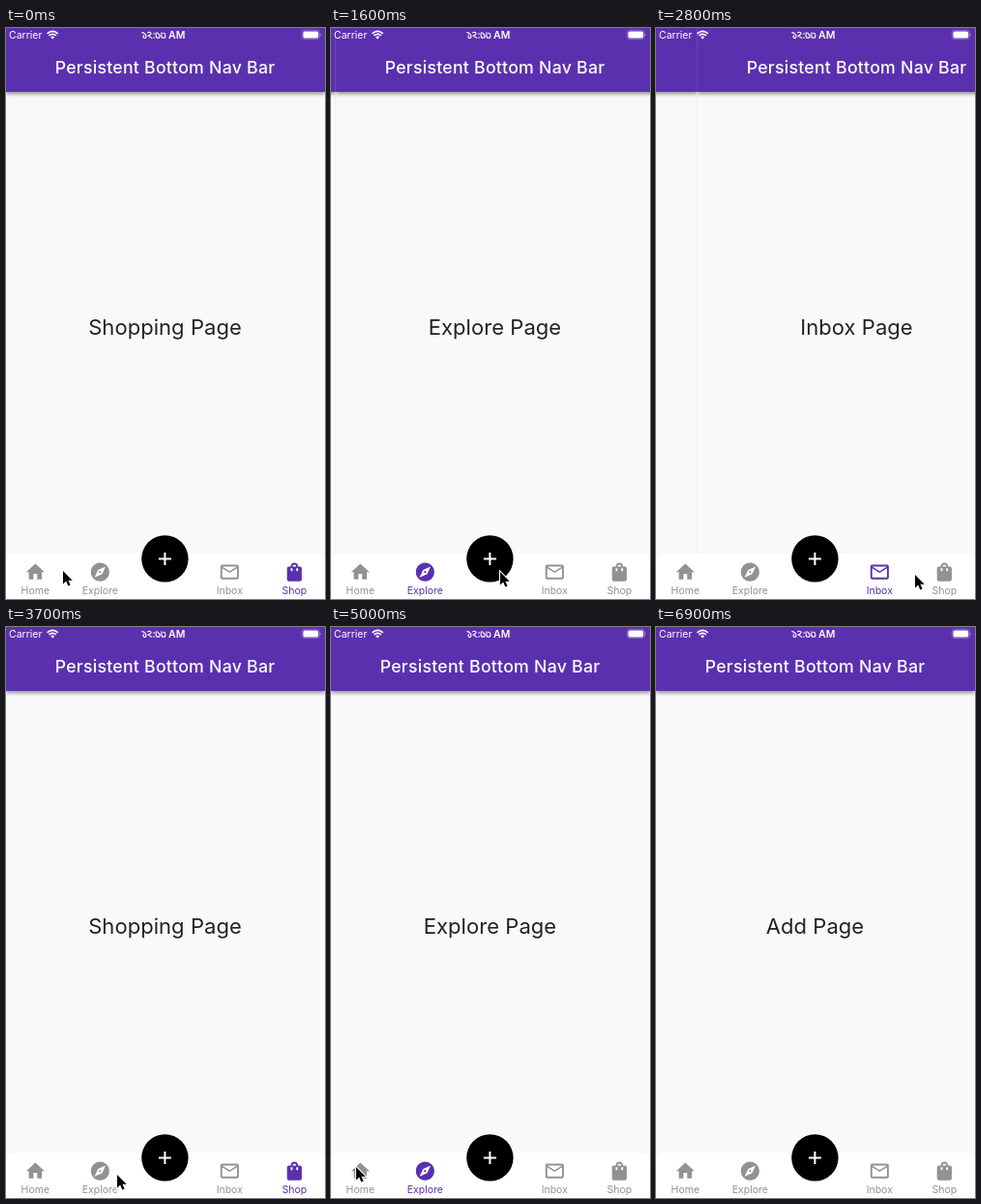
These frames come from a looping animation (330x590 px, 8100 ms). An HTML page:

```html
<!DOCTYPE html>
<html lang="en">
<head>
<meta charset="utf-8">
<title>Persistent Bottom Nav Bar</title>
<style>
  html, body { margin: 0; width: 330px; height: 590px; overflow: hidden; }
  body { position: relative; background: #f9f9f9; font-family: Inter, Roboto, sans-serif; }
  .page, #chrome { position: absolute; left: 0; top: 0; width: 330px; height: 590px; }
  .page { background: #f9f9f9; box-shadow: -1px 0 rgba(190, 190, 190, .15); visibility: hidden; }
  .page header {
    height: 65.5px; background: #5b30af; color: #fff;
    box-shadow: 0 1.5px 4px rgba(0, 0, 0, .45);
    clip-path: inset(0 0 -8px 0);
  }
  .page header, .page p { margin: 0; text-align: center; white-space: nowrap; }
  .page h1 {
    margin: 0; padding-top: 30px; text-indent: -1px; letter-spacing: .25px;
    font: 500 17.7px/22px Inter, Roboto, sans-serif;
  }
  .page p {
    position: absolute; top: 295px; width: 329px;
    font-size: 22px; line-height: 28px; letter-spacing: .05px; color: #222;
  }
  #chrome text { font-size: 10.5px; }
  .tab { fill: #929292; }
  .tab.on { fill: #5b30af; }
  .tab text { text-anchor: middle; }
</style>
</head>
<body>
<div id="pages"></div>
<svg id="chrome" viewBox="0 0 330 590">
  <g fill="#fff">
    <text x="3" y="11">Carrier</text>
    <text x="168" y="11" font-weight="600">AM</text>
    <circle cx="153" cy="6" r=".8"/><circle cx="153" cy="10" r=".8"/>
    <rect x="307.4" y="3.4" width="15.8" height="7" rx="1.6"/>
    <path d="M324.8 5.4q1.8 1.5 0 3z" opacity=".6"/>
  </g>
  <g fill="none" stroke="#fff">
    <!-- Bengali digits of the clock -->
    <g stroke-width="1.1" stroke-linecap="round" stroke-linejoin="round">
      <path d="M140.8 4.6C143 5 145.2 7 145 9A1.5 1.5 0 1 1 142.6 7.8"/>
      <path d="M146.6 4.9C148.4 3.6 150.5 4.6 150 6 149.6 7.2 148 7.6 147 8L150.8 10.4"/>
      <path d="M155.2 4.8V8.2a2 2 0 0 0 4 0c0-1.6-2-1.6-2.4-3.4"/>
      <path d="M160.9 4.8V8.2a2 2 0 0 0 4 0c0-2.2-1-3.4-2.2-2.8"/>
    </g>
    <path d="M42.6 5.8q5.6-5 11.2 0M44.5 7.9q3.7-3.2 7.4 0" stroke-width="1.7"/>
    <path d="M46.2 9.4q2-1.6 4 0l-2 2.2z" fill="#fff" stroke="none"/>
    <rect x="306.2" y="2.2" width="18.2" height="9.4" rx="2.6" stroke-width=".8" opacity=".3"/>
  </g>
  <path d="M0 590V553q0-10 10-10H320q10 0 10 10V590z" fill="#fff"/>
  <g id="tabs"></g>
  <circle cx="164.4" cy="548.4" r="24.2"/>
  <path d="M157.9 548.4h13M164.4 541.9v13" stroke="#fff" stroke-width="2"/>
  <path id="cursor" d="M0 0V13.6L3.2 10.6 5.3 15.6 7.6 14.6 5.4 9.8H9.7Z" stroke="#fff" stroke-width="2" paint-order="stroke"/>
</svg>
<script>
const WIDTH = 330, LOOP = 8100, STEP = 100, SLIDE = 200;
const HOME = 0, EXPLORE = 1, ADD = 2, INBOX = 3, SHOP = 4;
const names = ['Home', 'Explore', 'Add', 'Inbox', 'Shopping'];

const icons = {
  [HOME]: 'M10 20v-6h4v6h5v-8h3L12 3 2 12h3v8z',
  [EXPLORE]: 'M12 10.9c-.61 0-1.1.49-1.1 1.1s.49 1.1 1.1 1.1c.61 0 1.1-.49 1.1-1.1s-.49-1.1-1.1-1.1zM12 2C6.48 2 2 6.48 2 12s4.48 10 10 10 10-4.48 10-10S17.52 2 12 2zm2.19 12.19L6 18l3.81-8.19L18 6l-3.81 8.19z',
  [INBOX]: 'M20 4H4c-1.1 0-1.99.9-1.99 2L2 18c0 1.1.9 2 2 2h16c1.1 0 2-.9 2-2V6c0-1.1-.9-2-2-2zm0 14H4V8l8 5 8-5v10zm-8-7L4 6h16l-8 5z',
  [SHOP]: 'M18 6h-2c0-2.21-1.79-4-4-4S8 3.79 8 6H6c-1.1 0-2 .9-2 2v12c0 1.1.9 2 2 2h12c1.1 0 2-.9 2-2V8c0-1.1-.9-2-2-2zm-8 4c0 .55-.45 1-1 1s-1-.45-1-1V8h2v2zm2-6c1.1 0 2 .9 2 2h-4c0-1.1.9-2 2-2zm4 6c0 .55-.45 1-1 1s-1-.45-1-1V8h2v2z'
};

// Page opened at each time, starting from the shop
const visits = [
  [-SLIDE, SHOP], [280, HOME], [1431, EXPLORE], [2060, ADD], [2684, INBOX],
  [3386, SHOP], [4260, EXPLORE], [5160, HOME], [5966, ADD]
];

// Cursor tip: time, x, y
const path = [
  [0, 59, 561], [100, 34, 563], [500, 34, 563], [1000, 97, 564], [1400, 99, 564],
  [1600, 175, 562], [1900, 172, 558], [2200, 172, 558], [2500, 234, 563],
  [2700, 240, 564], [2800, 268, 565], [3000, 292, 566], [3200, 304, 566],
  [3400, 304, 566], [3700, 115, 566], [4000, 97, 563], [4400, 97, 563],
  [4800, 27, 558], [5000, 26, 558], [5600, 26, 558], [5900, 176, 553],
  [6000, 179, 555], [6100, 181, 559], [6300, 190, 610], [LOOP, 190, 610]
];

document.getElementById('pages').innerHTML = names.map(name =>
  `<div class="page"><header><h1>Persistent Bottom Nav Bar</h1></header><p>${name} Page</p></div>`).join('');

document.getElementById('tabs').innerHTML = Object.entries(icons).map(([i, d]) => {
  const x = 30.3 + 67 * i;
  const label = +i === SHOP ? 'Shop' : names[i];
  return `<g class="tab" data-page="${i}">
    <path transform="translate(${x - 11.4} 550.7) scale(.953)" d="${d}"/>
    <text x="${x}" y="584.5">${label}</text></g>`;
}).join('');

const pages = [...document.querySelectorAll('.page')];
const tabs = [...document.querySelectorAll('.tab')];
const cursor = document.getElementById('cursor');

const bezier = (a, b, u) => 3 * a * u * (1 - u) ** 2 + 3 * b * u * u * (1 - u) + u ** 3;

// Same curve as the CSS "ease" keyword
function ease(t) {
  if (t >= 1) return 1;
  let low = 0, high = 1;
  for (let i = 0; i < 24; i++) {
    const mid = (low + high) / 2;
    if (bezier(.25, .25, mid) < t) low = mid; else high = mid;
  }
  return bezier(.1, 1, low);
}

function drawPages(t) {
  const n = visits.findLastIndex(v => v[0] <= t);
  const [start, to] = visits[n];
  const from = n ? visits[n - 1][1] : to;
  const dir = Math.sign(to - from);
  const p = ease((t - start) / SLIDE);
  pages.forEach((page, i) => {
    const shown = i === to || (i === from && p < 1);
    const x = dir * WIDTH * (i === to ? 1 - p : -p);
    page.style.visibility = shown ? 'visible' : 'hidden';
    page.style.transform = `translateX(${Math.round(x)}px)`;
  });
  tabs.forEach(tab => tab.classList.toggle('on', +tab.dataset.page === to));
}

function drawCursor(t) {
  const n = path.findIndex(k => k[0] > t);
  const [t0, x0, y0] = path[n - 1], [t1, x1, y1] = path[n];
  const p = (t - t0) / (t1 - t0);
  cursor.setAttribute('transform', `translate(${x0 + (x1 - x0) * p} ${y0 + (y1 - y0) * p})`);
}

// The screen refreshes ten times a second
function draw() {
  const t = Math.floor(performance.now() % LOOP / STEP) * STEP;
  drawPages(t);
  drawCursor(t);
  requestAnimationFrame(draw);
}
draw();
</script>
</body>
</html>
```
